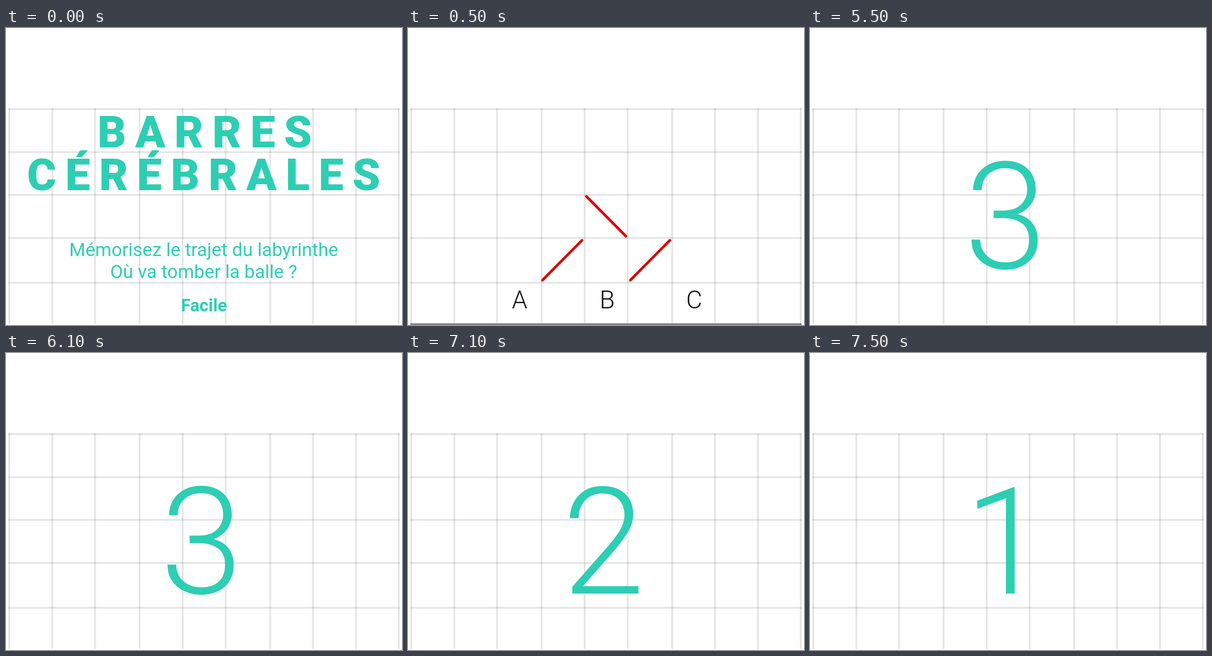
Animation of 667 by 500 pixels, one loop 8000 ms. Source, as an HTML page:

```html
<!DOCTYPE html>
<html lang="fr">
<head>
<meta charset="utf-8">
<title>Barres cérébrales</title>
<style>
  html, body { margin: 0; width: 100%; height: 100%; overflow: hidden; background: #fff; }
  svg { display: block; width: 667px; height: 500px; }
  text { font-family: Roboto, sans-serif; fill: #2dceb3; }
  .scene { opacity: 0; }
  .mid { text-anchor: middle; }
  .title { font-size: 75px; font-weight: 900; letter-spacing: .2em; }
  .intro { font-size: 31.25px; }
  .level { font-size: 29.17px; font-weight: 700; }
  .label { font-size: 41.67px; font-weight: 300; fill: #111; }
  .digit { font-size: 250px; font-weight: 300; }
  #grid { stroke: #000; stroke-opacity: .1; stroke-width: 3; }
  .bars { stroke: #dc0000; stroke-width: 4.6; stroke-linecap: round; fill: none; }
  .floor { stroke: #555; stroke-width: 2; }
</style>
</head>
<body>
<svg viewBox="0 0 667 500">
  <g id="grid"></g>

  <g class="scene mid">
    <text class="title" x="342.2" y="201.3">BARRES</text>
    <text class="title" x="340.5" y="273.3">CÉRÉBRALES</text>
    <text class="intro" x="333" y="384">Mémorisez le trajet du labyrinthe</text>
    <text class="intro" x="333" y="421">Où va tomber la balle ?</text>
    <text class="level" x="333.5" y="477">Facile</text>
  </g>

  <g class="scene mid">
    <path class="floor" d="M4 498.5H663"/>
    <path class="bars" d="M226.5 424.5L293 357.5M300.5 283.5L367 350.5M374.5 424.5L441 357.5"/>
    <text class="label" x="188" y="472">A</text>
    <text class="label" x="335.5" y="472">B</text>
    <text class="label" x="482" y="472">C</text>
  </g>

  <text class="scene digit" x="260" y="405">3</text>
  <text class="scene digit" x="260" y="405">2</text>
  <text class="scene digit" x="260" y="405">1</text>
</svg>
<script>
  const LOOP = 8000;
  const CUTS = [0, 500, 5500, 6500, 7500, LOOP];
  const COLS = [5.5, 78, 150, 225, 297.5, 370, 445, 517, 589.5, 661.5];
  const ROWS = [136.5, 209, 281, 353.5, 429];

  const line = d => `<path d="${d}"/>`;
  document.getElementById('grid').innerHTML =
    COLS.map(x => line(`M${x} 135V498`)).join('') +
    ROWS.map(y => line(`M4 ${y}H663`)).join('');

  // Each scene is shown between two neighbouring cuts.
  document.querySelectorAll('.scene').forEach((scene, i) => {
    const from = CUTS[i] / LOOP, to = CUTS[i + 1] / LOOP;
    const steps = [{ opacity: 1, offset: from }, { opacity: to < 1 ? 0 : 1, offset: to }];
    if (from > 0) steps.unshift({ opacity: 0, offset: 0 });
    if (to < 1) steps.push({ opacity: 0, offset: 1 });
    steps.forEach(s => s.easing = 'steps(1, end)');
    scene.animate(steps, { duration: LOOP, iterations: Infinity });
  });
</script>
</body>
</html>
```
